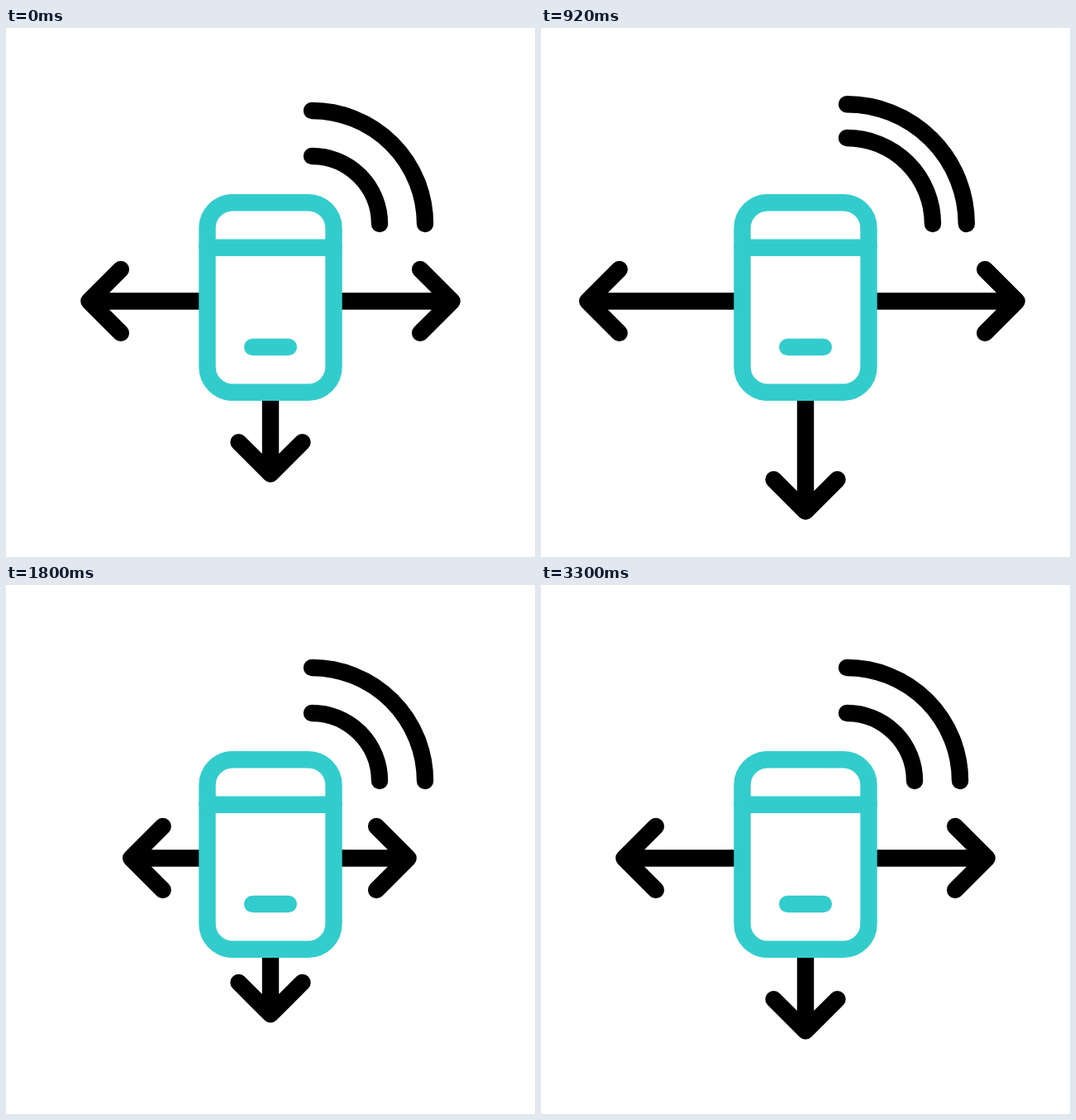
An HTML page that plays this animation: 640 by 640 pixels, repeating every 3.6 s.

```html
<!DOCTYPE html>
<html lang="en">
<head>
<meta charset="utf-8">
<title>Phone signal</title>
<style>
  html, body { margin: 0; width: 100%; height: 100%; overflow: hidden; background: #fff; }
  svg { display: block; width: 100%; height: 100%; }
  .ink, .phone { fill: none; stroke: #000; stroke-width: 20.4; stroke-linecap: round; stroke-linejoin: round; }
  .phone { stroke: #3cc; }
</style>
</head>
<body>
<svg viewBox="0 0 640 640">
  <g class="ink">
    <path id="outer"/>
    <path id="inner"/>
    <path id="left"/>
    <path id="right"/>
    <path id="down"/>
  </g>
  <g class="phone">
    <rect id="body" x="243.5" width="153" rx="30.7" fill="#fff"/>
    <path id="band"/>
    <path id="button"/>
  </g>
</svg>
<script>
const LOOP = 3600, STEP = 20;
const SOFT = 2 / 3, LONG = 0;  // how early the ease-out sets in
const BOTTOM = 440.7;

// Each move: start, end, value reached, ease-out handle. All tracks begin at 0.
const tracks = {
  left:  [[110, 620, -51, SOFT], [620, 1100, 51.3, .04], [1100, 1720, -51, SOFT], [1745, 3325, 0, LONG]],
  down:  [[160, 660, -20.2, SOFT], [660, 1142, 53.7, .04], [1142, 1764, -20.2, SOFT], [1800, 3315, 0, LONG]],
  right: [[220, 700, -53, SOFT], [700, 1180, 55.6, .04], [1180, 1800, -53, SOFT], [1866, 3300, 0, LONG]],
  outer: [[100, 565, 51.5, SOFT], [565, 1312, 0, LONG]],
  inner: [[270, 735, 46, SOFT], [735, 1452, 0, LONG]],
  phone: [[100, 600, 30, SOFT], [600, 900, 0, LONG]]
};

// Cubic Bezier ease with handles (1/3, 0) and (handle, 1), solved by bisection.
function ease(x, handle) {
  let lo = 0, hi = 1;
  for (let i = 0; i < 24; i++) {
    const t = (lo + hi) / 2, s = 1 - t;
    if (s * s * t + 3 * s * t * t * handle + t * t * t < x) lo = t; else hi = t;
  }
  return lo * lo * (3 - 2 * lo);
}

function valueAt(track, time) {
  let value = 0;
  for (const [start, end, target, handle] of track) {
    if (time <= start) break;
    if (time >= end) value = target;
    else return value + (target - value) * ease((time - start) / (end - start), handle);
  }
  return value;
}

function set(id, attrs) {
  const node = document.getElementById(id);
  for (const name in attrs) node.setAttribute(name, attrs[name]);
}

const arc = r => `M370 ${237 - r}A${r} ${r} 0 0 1 ${370 + r} 237`;

function sideArrow(tip, direction) {
  const back = tip - direction * 38.5;
  return `M320 330.5H${tip}M${back} 292L${tip} 330.5L${back} 369`;
}

function downArrow(tip) {
  const back = tip - 38.5;
  return `M320 400V${tip}M281.5 ${back}L320 ${tip}L358.5 ${back}`;
}

function draw(time) {
  const at = name => valueAt(tracks[name], time);
  set('outer', { d: arc(137 + at('outer')) });
  set('inner', { d: arc(82 + at('inner')) });
  set('left', { d: sideArrow(100.4 - at('left'), -1) });
  set('right', { d: sideArrow(539.6 + at('right'), 1) });
  set('down', { d: downArrow(539.6 + at('down')) });

  // The phone stretches upward from its bottom edge.
  const height = 229.4 + at('phone'), k = height / 229.4;
  set('body', { y: BOTTOM - height, height, ry: 30.7 * k });
  set('band', { d: `M243.5 ${BOTTOM - 175 * k}H396.5` });
  set('button', { d: `M298.2 ${BOTTOM - 54.7 * k}H341.8` });
}

const origin = performance.now();
function frame() {
  const time = (performance.now() - origin) % LOOP;
  draw(Math.floor(time / STEP) * STEP);
  requestAnimationFrame(frame);
}
frame();
</script>
</body>
</html>
```
